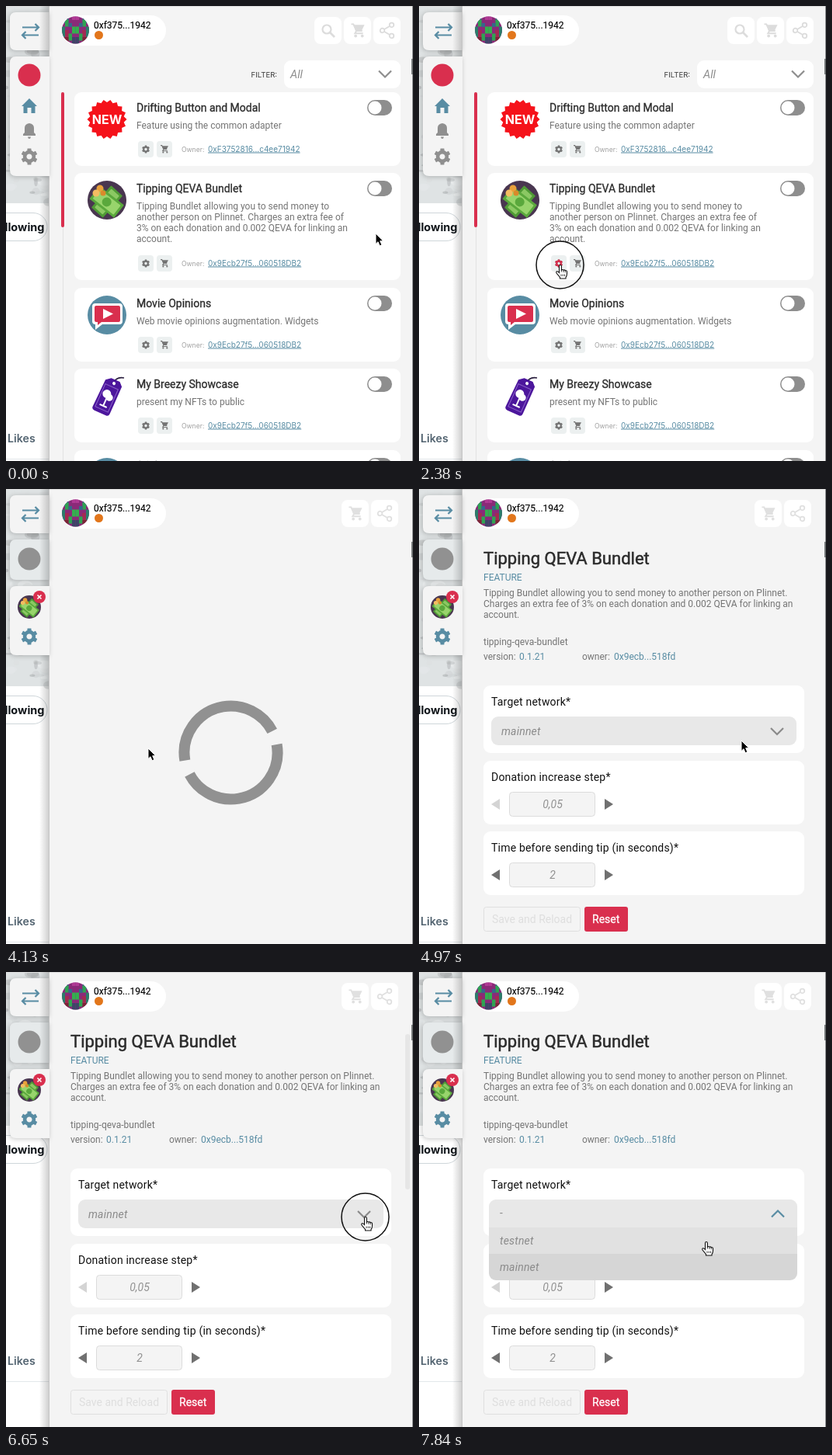
Recreate the animation shown at these times as an HTML page. Size 524 by 586 pixels, loop 8 s.

```html
<!DOCTYPE html>
<html lang="en">
<head>
<meta charset="utf-8">
<title>Extension settings</title>
<style>
html, body { margin: 0; width: 100%; height: 100%; overflow: hidden; background: #fff; }
svg { display: block; width: 524px; height: 586px; font-family: Roboto, sans-serif; }
text { white-space: pre; }
.inter { font-family: Inter, sans-serif; }
.ital { font-style: italic; }
.tab { filter: drop-shadow(-1px 1px 3px rgba(0,0,0,.22)); }
</style>
</head>
<body>
<svg id="stage" viewBox="0 0 524 586"></svg>
<script>
const LOOP = 8000, STEP = 70;
const RED = '#d92f4e', TEAL = '#588ca3', GREY = '#747474', PANEL = '#f4f4f4';

// Drawing helpers
const rect = (x, y, w, h, fill, r = 0, more = '') =>
  `<rect x="${x}" y="${y}" width="${w}" height="${h}" rx="${r}" fill="${fill}" ${more}/>`;
const disc = (x, y, r, fill, more = '') => `<circle cx="${x}" cy="${y}" r="${r}" fill="${fill}" ${more}/>`;
const path = (d, fill, more = '') => `<path d="${d}" fill="${fill}" ${more}/>`;
const line = (d, color, w, more = '') =>
  path(d, 'none', `stroke="${color}" stroke-width="${w}" ${more}`);
const text = (x, y, size, fill, str, more = '') =>
  `<text x="${x}" y="${y}" font-size="${size}" fill="${fill}" ${more}>${str}</text>`;
const at = (x, y, body, more = '') => `<g transform="translate(${x} ${y}) ${more}">${body}</g>`;
const group = (id, body) => `<g id="${id}">${body}</g>`;
const range = (n, f) => Array.from({ length: n }, (_, i) => f(i)).join('');

const gear = (x, y, r, color) => at(x, y,
  disc(0, 0, r * .56, 'none', `stroke="${color}" stroke-width="${r * .44}"`) +
  range(6, i => rect(-r * .24, -r, r * .48, r * .36, color, r * .06, `transform="rotate(${i * 60})"`)));

const cart = (x, y, s, color) => at(x, y,
  line('M-9-8h3l4 9h8', color, 2) + path('M-6-7H9L5 1H-3Z', color) +
  line('M-2 1l-2 3.5H7', color, 2) + disc(-3, 8, 2, color) + disc(6, 8, 2, color), `scale(${s})`);

const share = (x, y, c) => at(x, y, line('M6-7L-6 0L6 7', c, 1.8) +
  [[6, -7], [-6, 0], [6, 7]].map(p => disc(...p, 2.8, '#fff', `stroke="${c}" stroke-width="1.8"`)).join(''));

const lens = (x, y, c) => disc(x - 2, y - 2, 5.5, 'none', `stroke="${c}" stroke-width="2.2"`) +
  line(`M${x + 2} ${y + 2}l6 6`, c, 2.6);

const chevron = (x, y, color, dir = 1) =>
  line(`M${x - 8} ${y - 4 * dir}L${x} ${y + 4 * dir}L${x + 8} ${y - 4 * dir}`, color, 2.2);

const tab = (y, h, fill) => path(`M56 ${y}H13q-8 0-8 8V${y + h - 8}q0 8 8 8H56Z`, fill, 'class="tab"');

// Round pictures, each centred on 0,0
const money = disc(0, 0, 25, '#493650') +
  at(0, 2, rect(-19, -10, 38, 20, '#4f9a35', 1) + rect(-16, -7, 32, 14, '#8bc863', 1), 'rotate(-48)') +
  at(0, 2, rect(-20, -10, 40, 21, '#5aa83c', 1) + rect(-17, -7, 34, 15, '#98d46c', 1) +
    disc(0, .5, 6, '#5aa83c'), 'rotate(38)') +
  disc(-9, -15, 4.5, '#e9a13b') + disc(-14, -9, 4.5, '#f3bd62') + disc(-5, -9, 3.5, '#d98a2b');

const burst = path('M' + Array.from({ length: 36 }, (_, i) => {
  const a = i * Math.PI / 18, r = i % 2 ? 22 : 25.5;
  return (r * Math.cos(a)).toFixed(1) + ' ' + (r * Math.sin(a)).toFixed(1);
}).join('L') + 'Z', '#f5121a') +
  text(0, 5.5, 16, '#fff', 'NEW', 'text-anchor="middle" font-weight="700" class="inter"');

const video = disc(0, 0, 25, TEAL) +
  path('M-15-15H16q4 0 4 4V8q0 4-4 4H-6l-9 7v-7q-4 0-4-4V-11q0-4 4-4Z', '#fff') +
  path('M-14-12H15q2 0 2 2V7q0 2-2 2H-7l-5 4V9h-2q-2 0-2-2V-10q0-2 2-2Z', RED) +
  path('M-5-8L8-1.5L-5 5Z', '#fff');

const label = line('M8-16q4-9 14-7', '#2c2140', 1.6) +
  at(0, 2, path('M-11-20L-5-25H7L12-20V18q0 4-4 4H-8q-4 0-4-4Z', '#4c169c') +
    path('M-9-15H9V17H-9Z', 'none', 'stroke="#8b62c8"') + disc(1, -20, 2, '#fff') +
    disc(-2, -4, 5.5, '#fff') + disc(3, -1, 4.5, '#fff') + line('M0 0V12M-5 12H5', '#fff', 2), 'rotate(24)');

const avatar = `<clipPath id="face">${disc(0, 0, 17.5, '#000')}</clipPath><g clip-path="url(#face)">` +
  rect(-18, -18, 36, 36, '#8a2a78') +
  [[18, -18, 9, 9, '#35688a'], [13.5, -13.5, 4.5, 9, '#2fa352'], [18, -4.5, 4.5, 14, '#2b7d6b'],
   [9, -9, 4.5, 5, '#35688a'], [4.5, -4.5, 4.5, 9, '#33b04f'], [13.5, 0, 5, 9, '#a32a52'],
   [9, 4.5, 4.5, 9, '#2fa352'], [4.5, 9, 4.5, 9, '#3f4468'], [18, 9, 9, 9, '#7b2536'],
   [4.5, -18, 4.5, 5, '#b03a94']]
    .map(([x, y, w, h, c]) => rect(-x, y, w, h, c) + rect(x - w, y, w, h, c)).join('') + '</g>';

// Page behind the panel
let seed = 7;
const rnd = () => (seed = seed * 16807 % 2147483647) / 2147483647;
const blots = range(90, () => {
  const g = 150 + Math.round(rnd() * 100);
  return `<ellipse cx="${rnd() * 56}" cy="${rnd() * 254}" rx="${2 + rnd() * 8}" ry="${1 + rnd() * 5}"
    fill="rgb(${g},${g + 3},${g + 4})" opacity=".4"/>`;
});
const page = group('page', rect(0, -60, 56, 314, '#dfe3e4') + blots +
  rect(-60, 266.5, 113, 36, '#fff', 18, 'stroke="#cfd6da"') +
  text(49.5, 290, 14.5, '#0f1419', 'Following', 'font-weight="700" text-anchor="end" class="inter"') +
  text(2, 562, 14.2, '#536471', 'Likes', 'font-weight="600" class="inter"') +
  rect(0, 583, 56, 1, '#e3e7ea'));

const shade = rect(43, 0, 13, 586, 'url(#edge)');
const swap = line('M21 27.5H42M37.5 23L42 27.5L37.5 32M42 37.5H21M25.500 33L21 37.5L25.5 42', TEAL, 2.2);

const listTabs = tab(8, 49, PANEL) + shade + tab(65, 154, PANEL) + swap + disc(30, 89, 14.5, RED) +
  path('M30 119L40 129H37.500V138H32.500V131H27.500V138H22.500V129H20Z', TEAL) +
  path('M22 167V165L24 163V157q0-5 6-6q6 1 6 6v6l2 2v2ZM28 168.500h4q-.5 2.500-2 2.500t-2-2.500Z', '#8f8f8f') +
  gear(30, 194, 10.5, '#8f8f8f');

const settingsTabs = tab(8, 49, PANEL) + tab(65, 52, '#e6eaeb') + shade + tab(125, 89, PANEL) + swap +
  disc(30, 90, 14.5, '#919191') +
  group('app', at(30, 152, money, 'scale(.6)') + disc(43, 139, 8, RED) +
    line('M40.500 136.500l5 5m0-5l-5 5', '#fff', 1.6)) + gear(30, 190, 10.5, TEAL);

// Panel shell
const shell = rect(55, 0, 468, 586, PANEL) + rect(0, 0, 523, 1, '#dcdcdc') + rect(523, 0, 1, 586, '#85888a') +
  rect(522, 68, 2, 20, '#6c6f70') + rect(72, 12, 134, 39, '#fff', 19.5) + at(89.5, 31, avatar) +
  text(113, 29, 12, '#000', '0xf375...1942', 'stroke="#000" stroke-width=".15"') + disc(119.5, 37.5, 5.5, '#e2761b');

const tool = x => rect(x, 14, 35, 35, '#fff', 8);

// List view
const card = (y, h, name, desc, owner, icon) => {
  const foot = y + h - 22;
  return rect(88, y, 420, h, '#fff', 9) + at(130, y + 35, icon) +
    rect(465, y + 10, 32, 20, '#8e8e8e', 10) + disc(475, y + 20, 8.5, '#fff') +
    text(168, y + 25, 14, '#2b2b2b', name, 'stroke="#2b2b2b" stroke-width=".3"') +
    desc.map((s, i) => text(168, y + 46.5 + i * 14.1, 12, '#747474', s)).join('') +
    rect(170, foot - 10, 20, 21, '#ecf0f0', 4) + rect(194, foot - 10, 20, 21, '#ecf0f0', 4) +
    gear(180, foot + .5, 5, GREY) + cart(204, foot, .55, GREY) +
    text(226, foot + 3.5, 8.6, '#a0a0a0', 'Owner:', 'class="inter"') +
    text(260, foot + 3.5, 10, TEAL, owner, 'class="inter" text-decoration="underline"');
};
const LONG = '0x9Ecb27f5...060518DB2';
const list = group('list', listTabs + tool(397) + tool(435) + tool(473) + lens(415, 32, '#dcdcdc') +
  cart(453, 31, .95, '#dcdcdc') + share(490.5, 31.5, '#dcdcdc') +
  text(315.5, 92, 9.6, '#3d3d3d', 'FILTER:', 'class="inter"') +
  rect(358, 70, 150, 36, '#fff', 9) + text(366, 93, 14.5, '#8e8e8e', 'All', 'class="ital"') +
  chevron(488, 87.5, '#8e8e8e') +
  rect(73, 111, 1, 475, '#e2e2e2') + rect(71, 111, 4, 174, RED, 2) +
  card(111, 95, 'Drifting Button and Modal', ['Feature using the common adapter'], '0xF3752816...c4ee71942', burst) +
  card(215, 138, 'Tipping QEVA Bundlet', ['Tipping Bundlet allowing you to send money to',
    'another person on Plinnet. Charges an extra fee of', '3% on each donation and 0.002 QEVA for linking an',
    'account.'], LONG, money) +
  card(363, 95, 'Movie Opinions', ['Web movie opinions augmentation. Widgets'], LONG, video) +
  card(467, 95, 'My Breezy Showcase', ['present my NFTs to public'], LONG, label) +
  card(572, 95, 'Sticker', [''], LONG, video) +
  group('hotGear', gear(180, 331.5, 5, RED)));

// Settings view
const box = (y, h, name) => rect(83, y, 413, h, '#fff', 9) +
  text(93, y + 25.5, 14, '#111', name, 'letter-spacing=".2"');
const stepper = (y, value, left) => path(`M93 ${y}l11-7v14Z`, left) + path(`M250 ${y}l-11-7v14Z`, '#707070') +
  rect(116.5, y - 15.500, 110, 31, PANEL, 4, 'stroke="#dcdcdc"') +
  text(172, y + 5, 14, '#919191', value, 'class="ital" text-anchor="middle"');
const option = (y, s) => text(104, y, 14, '#8a8a8a', s, 'class="ital" letter-spacing=".2"');

const form = group('form',
  text(83, 97, 22, '#2b2b2b', 'Tipping QEVA Bundlet', 'stroke="#2b2b2b" stroke-width=".5"') +
  text(83, 118, 12, TEAL, 'FEATURE') +
  ['Tipping Bundlet allowing you to send money to another person on Plinnet.',
   'Charges an extra fee of 3% on each donation and 0.002 QEVA for linking an', 'account.']
    .map((s, i) => text(83, 137.5 + i * 14.2, 12, GREY, s)).join('') +
  text(83, 201, 12, GREY, 'tipping-qeva-bundlet') +
  text(83, 220, 12, GREY, 'version:') + text(129, 220, 12, TEAL, '0.1.21') +
  text(210, 220, 12, GREY, 'owner:') + text(251, 220, 12, TEAL, '0x9ecb...518fd') +
  box(253, 87, 'Target network*') + box(350, 82, 'Donation increase step*') +
  box(441, 82, 'Time before sending tip (in seconds)*') +
  rect(93, 293, 393, 37, '#e8e8e8', 9) +
  text(106, 316.5, 14, '#8a8a8a', 'mainnet', 'class="ital" letter-spacing=".2"') +
  group('arrow', chevron(461, 312, '#8a8a8a')) +
  stepper(406, '0,05', '#d4d4d4') + stepper(497, '2', '#707070') +
  rect(83.5, 538.5, 124, 31, PANEL, 3, 'stroke="#dfdfdf"') + text(94, 559, 14, '#dedede', 'Save and Reload') +
  rect(213, 538, 56, 32, RED, 3) + text(223, 558.5, 14, '#fff', 'Reset', 'stroke="#fff" stroke-width=".3"') +
  group('thumb', rect(514, 80, 6, 200, '#e6e6e6', 3)) +
  group('menu', '<clipPath id="fold"><rect id="foldBox" x="90" y="293" width="397" height="104" rx="9"/></clipPath>' +
    '<g clip-path="url(#fold)">' + rect(90, 293, 397, 37, '#e8e8e8') + rect(90, 329, 397, 34, '#e1e1e1') +
    rect(90, 363, 397, 34, '#d6d6d6') + option(315, '-') + option(351, 'testnet') + option(385, 'mainnet') +
    chevron(462, 311.5, TEAL, -1) + '</g>'));

const settings = group('settings', settingsTabs + tool(432) + tool(470) +
  cart(450, 31, .95, '#e0e0e0') + share(487.5, 31.5, '#e0e0e0') +
  group('spinner', disc(0, 0, 60, 'none', 'stroke="#919191" stroke-width="14" stroke-dasharray="169.6 18.9"')) + form);

const cursor = group('cursor',
  group('pointer', path('M0 0V13.500L3 10.700L5.100 15.800L7.800 14.600L5.700 9.700H9.700Z', '#000',
    'stroke="#fff" stroke-width="1"')) +
  group('hand', path('M-1.500 1q0-1.500 1.400-1.500t1.500 1.500V6q1.300-1 2.500.2q1.300-.8 2.300.4q2.300-.4 2.300 2V11' +
    'q0 2.500-1.500 4.500V17H-.5V15.500L-5 10q-.8-1.600.6-2.200q1.200-.3 2.900 1.700Z', '#fff',
    'stroke="#111" stroke-width="1.100"') + line('M1.400 6V8.500M4 6.500V9M6.300 7V9.300M1 11.500V14M3.300 11.500V14M5.500 11.500V14', '#111', .8)));

document.getElementById('stage').innerHTML =
  '<defs><linearGradient id="edge"><stop offset="0" stop-opacity="0"/><stop offset="1" stop-opacity=".2"/></linearGradient></defs>' +
  rect(0, 0, 524, 586, '#fff') + page + shell + list + settings +
  `<circle id="ring" r="30.5" fill="none" stroke="#111" stroke-width="1.5"/>` + cursor;

// Motion: time, x, y
const TRAIL = [[0, 476, 293], [210, 400, 410], [350, 280, 505], [490, 140, 440], [560, 113, 330], [630, 135, 230],
  [700, 165, 188], [770, 182, 270], [840, 180, 332], [980, 182, 333], [1190, 182, 333], [1260, 182, 328],
  [1750, 182, 328], [1960, 182, 334], [2450, 182, 334], [2520, 183, 334], [4130, 183, 334], [4340, 222, 345],
  [4620, 345, 345], [4900, 415, 324], [6090, 415, 324], [6300, 463, 316], [7280, 463, 316], [7490, 432, 325],
  [7700, 385, 342], [7840, 370, 348]];
const CLICKS = [1260, 2310, 6510];
const PULSE = [18, 30.5, 30.5, 22];

const $ = id => document.getElementById(id);
const show = (id, on) => { $(id).style.display = on ? '' : 'none'; };
const move = (id, x, y, more = '') => $(id).setAttribute('transform', `translate(${x} ${y}) ${more}`);
const part = (t, a, b) => Math.min(1, Math.max(0, (t - a) / (b - a)));
const within = (t, a, b) => t >= a && t < b;

function spot(t) {
  const i = TRAIL.findIndex(k => k[0] > t);
  if (i < 0) return TRAIL[TRAIL.length - 1].slice(1);
  const [a, b] = [TRAIL[i - 1], TRAIL[i]], p = part(t, a[0], b[0]);
  return [a[1] + (b[1] - a[1]) * p, a[2] + (b[2] - a[2]) * p];
}

function draw(now) {
  const t = Math.floor(now % LOOP / STEP) * STEP;
  const [x, y] = spot(t);
  const hand = within(t, 910, 2520) || t >= 6300;
  move('cursor', x, y);
  show('hand', hand);
  show('pointer', !hand);

  const click = CLICKS.find(c => within(t, c, c + PULSE.length * STEP));
  const pressed = click !== undefined && t !== 2520;
  show('ring', pressed);
  if (pressed) {
    $('ring').setAttribute('r', PULSE[(t - click) / STEP]);
    move('ring', x - .5, y - .5);
  }

  const opened = t >= 2520, ready = t >= 4340;
  show('list', !opened);
  show('settings', opened);
  show('hotGear', t >= 910);
  show('app', t >= 3290);
  show('spinner', !ready);
  show('form', ready);
  move('spinner', 289.5, 339.5, `rotate(${t < 4130 ? -40 : -10 + (t - 4130) * .36})`);
  $('arrow').style.opacity = t < 4970 ? .75 : 1;

  const p = part(t, 5530, 5950);
  move('page', 0, -56 * p * (2 - p));
  show('thumb', within(t, 5600, 6860));
  show('menu', t >= 6720);
  $('foldBox').setAttribute('height', 37 + 67 * part(t, 6650, 6860));
}

const start = performance.now();
const tick = () => { draw(performance.now() - start); requestAnimationFrame(tick); };
tick();
</script>
</body>
</html>
```
